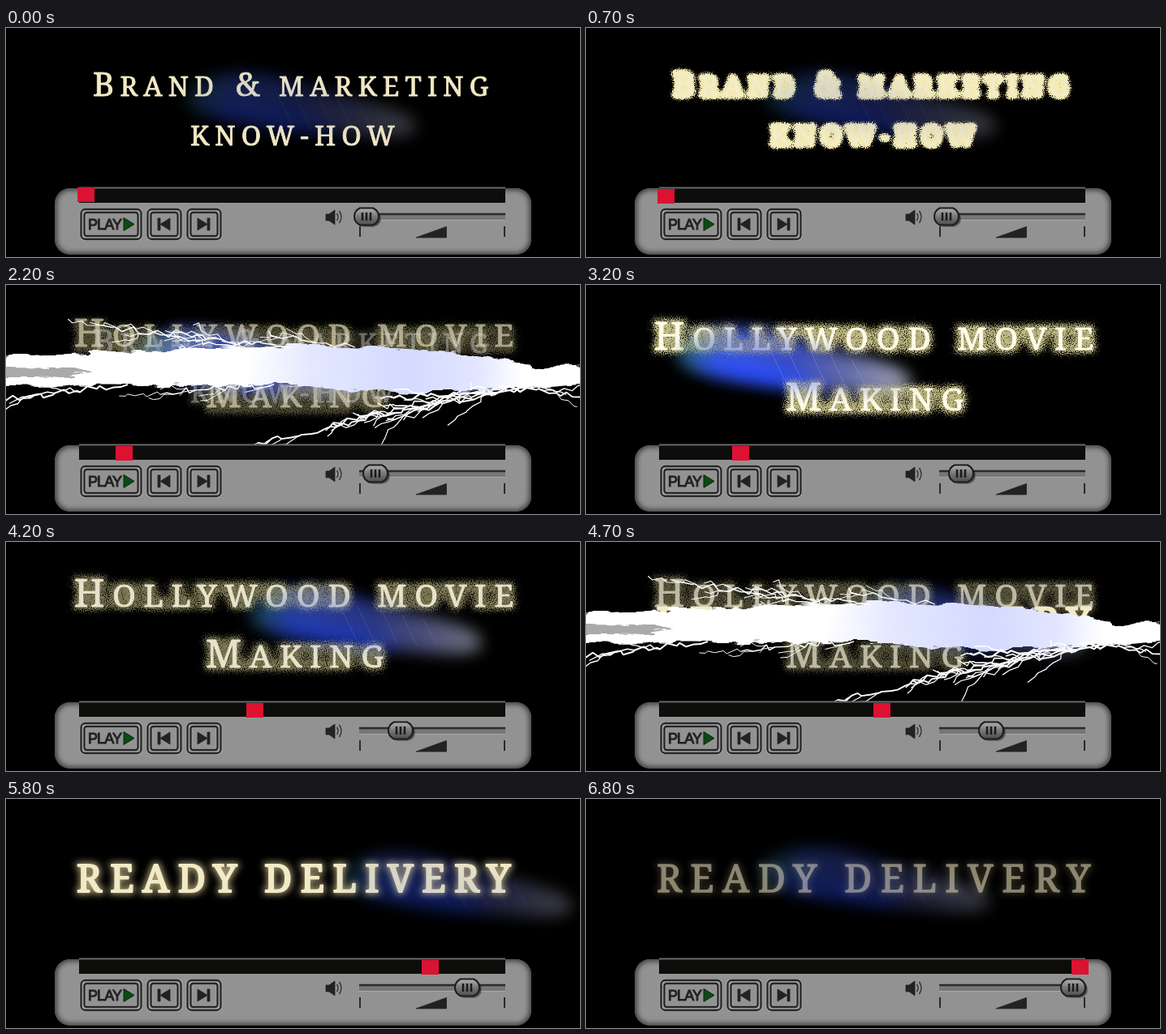
Animation of 707x283 px, one loop 7300 ms. Source, as an HTML page:

```html
<!DOCTYPE html>
<html lang="en">
<head>
<meta charset="utf-8">
<title>Title player</title>
<style>
html, body { margin: 0; width: 100%; height: 100%; overflow: hidden; background: #000; }
svg { display: block; width: 100%; height: 100%; }
.anim { animation: 7300ms step-end infinite; }
.face { font-family: "Noto Serif", "Liberation Serif", serif; fill: currentColor; stroke: currentColor; stroke-linejoin: round; }
.title { color: #f2e9c6; stroke-width: .9px; }
#t1 { font-size: 33px; letter-spacing: 7.2px; }
#t2 { font-size: 39px; letter-spacing: 9.7px; }
#t3 { font-size: 47px; letter-spacing: 10.5px; }
.first { animation-name: first; }
.second { animation-name: second; }
.third { animation-name: third; }
.fuzz1 { animation-name: fuzz1; filter: url(#fuzz); }
.halo1 { animation-name: halo1; filter: url(#halo); }
.halo2 { animation-name: halo2; filter: url(#halo); }
.soft3 { animation-name: soft3; filter: url(#soft); }
.streak { animation-name: streak; }
.bolt { animation-name: bolt; }
.head { animation-name: head; }
.knob { animation-name: knob; }

@keyframes first {
  0% { opacity: 1; color: #f2e9c6; }
  9.589% { opacity: 1; color: #f3ecc8; }
  16.438% { opacity: .95; color: #eeeada; }
  23.287% { opacity: .9; color: #dcdce4; }
  30.136% { opacity: .4; color: #dcdce4; }
  43.835%, 100% { opacity: 0; }
}
@keyframes fuzz1 {
  0% { opacity: 0; }
  2.739% { opacity: .4; }
  9.589% { opacity: 1; }
  16.438% { opacity: .5; }
  23.287%, 100% { opacity: 0; }
}
@keyframes halo1 {
  0% { opacity: 0; }
  16.438% { opacity: .8; }
  23.287% { opacity: .5; }
  30.136% { opacity: .2; }
  43.835%, 100% { opacity: 0; }
}
@keyframes second {
  0% { opacity: 0; transform: translateY(-8px); }
  23.287% { opacity: .22; transform: translateY(-8px); }
  30.136% { opacity: .6; transform: translateY(-4px); }
  43.835% { opacity: 1; transform: none; color: #fffbea; }
  57.534% { opacity: .9; transform: none; color: #f6f0da; }
  64.383% { opacity: .7; transform: none; color: #f0ead6; }
  65.753%, 100% { opacity: 0; transform: none; }
}
@keyframes halo2 {
  0% { opacity: 0; }
  30.136% { opacity: .4; }
  43.835% { opacity: 1; }
  50.684% { opacity: .85; }
  57.534% { opacity: .65; }
  64.383% { opacity: .45; }
  65.753%, 100% { opacity: 0; }
}
@keyframes third {
  0% { opacity: 0; }
  64.383% { opacity: 1; stroke-width: 3px; }
  72.602% { opacity: 1; stroke-width: 2.6px; }
  79.452% { opacity: 1; stroke-width: 2.2px; }
  86.301% { opacity: .75; stroke-width: 1.7px; }
  93.15%, 100% { opacity: .5; stroke-width: 1.3px; }
}
@keyframes soft3 {
  0% { opacity: 0; }
  64.383% { opacity: .4; }
  65.753% { opacity: 1; }
  72.602% { opacity: .9; }
  79.452% { opacity: .75; }
  86.301% { opacity: .45; }
  93.15%, 100% { opacity: .2; }
}
@keyframes streak {
  0% { opacity: .27; transform: translate(360px, 95px); }
  23.287% { opacity: .36; transform: translate(360px, 95px); }
  30.136% { opacity: .8; transform: translate(300px, 95px); }
  43.835% { opacity: 1; transform: translate(253px, 94px); }
  50.684% { opacity: .75; transform: translate(360px, 95px); }
  57.534% { opacity: .6; transform: translate(440px, 98px); }
  64.383% { opacity: .45; transform: translate(470px, 98px); }
  65.753% { opacity: .27; transform: translate(360px, 98px); }
  79.452% { opacity: .28; transform: translate(552px, 106px); }
  86.301%, 100% { opacity: .27; transform: translate(352px, 99px); }
}
@keyframes bolt {
  0% { opacity: 0; }
  30.136% { opacity: 1; }
  43.835% { opacity: 0; }
  64.383% { opacity: 1; }
  65.753%, 100% { opacity: 0; }
}
@keyframes head {
  0% { transform: translate(88px, 197px); }
  2.739% { transform: translate(88px, 199px); }
  23.287% { transform: translate(102px, 199px); }
  30.136% { transform: translate(135px, 199px); }
  43.835% { transform: translate(180px, 199px); }
  50.684% { transform: translate(238px, 199px); }
  57.534% { transform: translate(296px, 199px); }
  64.383% { transform: translate(354px, 199px); }
  65.753% { transform: translate(407px, 199px); }
  72.602% { transform: translate(460px, 199px); }
  79.452% { transform: translate(512px, 199px); }
  86.301% { transform: translate(555px, 199px); }
  93.15%, 100% { transform: translate(598px, 199px); }
}
@keyframes knob {
  0% { transform: translate(444px, 233px); }
  23.287% { transform: translate(449px, 233px); }
  30.136% { transform: translate(455px, 233px); }
  43.835% { transform: translate(462px, 233px); }
  50.684% { transform: translate(474px, 233px); }
  57.534% { transform: translate(486px, 233px); }
  64.383% { transform: translate(499px, 233px); }
  65.753% { transform: translate(522px, 233px); }
  72.602% { transform: translate(545px, 233px); }
  79.452% { transform: translate(568px, 233px); }
  86.301% { transform: translate(584px, 233px); }
  93.15%, 100% { transform: translate(600px, 233px); }
}
</style>
</head>
<body>
<svg viewBox="0 0 707 283" preserveAspectRatio="none">
  <defs>
    <filter id="fuzz" filterUnits="userSpaceOnUse" x="0" y="0" width="707" height="200" color-interpolation-filters="sRGB">
      <feMorphology in="SourceAlpha" operator="dilate" radius="1.5"/>
      <feGaussianBlur stdDeviation="3.6"/>
      <feComponentTransfer result="soft"><feFuncA type="linear" slope="1.6"/></feComponentTransfer>
      <feTurbulence type="fractalNoise" baseFrequency=".9" seed="4" result="grain"/>
      <feComposite in="soft" in2="grain" operator="arithmetic" k2="3" k3="5" k4="-3.4" result="mask"/>
      <feComponentTransfer in="soft" result="reach"><feFuncA type="linear" slope="2"/></feComponentTransfer>
      <feComposite in="mask" in2="reach" operator="in" result="cut"/>
      <feFlood flood-color="#f3eab4"/>
      <feComposite in2="cut" operator="in"/>
    </filter>
    <filter id="halo" filterUnits="userSpaceOnUse" x="0" y="0" width="707" height="200" color-interpolation-filters="sRGB">
      <feMorphology in="SourceAlpha" operator="dilate" radius="6"/>
      <feGaussianBlur stdDeviation="6" result="soft"/>
      <feTurbulence type="fractalNoise" baseFrequency=".9" seed="9" result="grain"/>
      <feComposite in="soft" in2="grain" operator="arithmetic" k2="1.9" k3="4" k4="-2.7" result="mask"/>
      <feComponentTransfer in="soft" result="reach"><feFuncA type="linear" slope="1.3"/></feComponentTransfer>
      <feComposite in="mask" in2="reach" operator="in" result="cut"/>
      <feFlood flood-color="#c2bc84"/>
      <feComposite in2="cut" operator="in"/>
    </filter>
    <filter id="soft" filterUnits="userSpaceOnUse" x="0" y="0" width="707" height="200" color-interpolation-filters="sRGB">
      <feMorphology in="SourceAlpha" operator="dilate" radius="2"/>
      <feGaussianBlur stdDeviation="4.5" result="blur"/>
      <feFlood flood-color="#e6d6a0"/>
      <feComposite in2="blur" operator="in"/>
    </filter>
    <filter id="blur" filterUnits="userSpaceOnUse" x="-220" y="-90" width="440" height="180"><feGaussianBlur stdDeviation="10"/></filter>
    <filter id="edge" filterUnits="userSpaceOnUse" x="40" y="180" width="627" height="103"><feGaussianBlur stdDeviation="3"/></filter>
    <filter id="ragged" filterUnits="userSpaceOnUse" x="-20" y="40" width="747" height="110">
      <feTurbulence type="fractalNoise" baseFrequency=".025 .09" numOctaves="3" seed="6"/>
      <feDisplacementMap in="SourceGraphic" scale="16" xChannelSelector="R" yChannelSelector="A"/>
    </filter>
    <linearGradient id="beam">
      <stop offset="0" stop-color="#2a7088" stop-opacity=".8"/>
      <stop offset=".2" stop-color="#3a58d0"/>
      <stop offset=".5" stop-color="#3c50c8" stop-opacity=".9"/>
      <stop offset=".72" stop-color="#6870b4" stop-opacity=".9"/>
      <stop offset="1" stop-color="#a4a8b4"/>
    </linearGradient>
    <linearGradient id="flare" gradientUnits="userSpaceOnUse" x1="0" y1="0" x2="707" y2="0">
      <stop offset=".42" stop-color="#fff"/>
      <stop offset=".53" stop-color="#e4e8ff"/>
      <stop offset=".7" stop-color="#d4daff"/>
      <stop offset=".82" stop-color="#e2e6ff"/>
      <stop offset=".9" stop-color="#fff"/>
    </linearGradient>
    <linearGradient id="metal" x2="0" y2="1">
      <stop offset="0" stop-color="#b0b0b0"/>
      <stop offset=".5" stop-color="#787878"/>
      <stop offset="1" stop-color="#4c4c4c"/>
    </linearGradient>
    <clipPath id="body"><rect x="60" y="198" width="587" height="82" rx="19"/></clipPath>

    <g id="t1" class="face">
      <text x="107" y="84"><tspan font-size="40">B</tspan>RAND</text>
      <text x="283" y="84" font-size="40">&amp;</text>
      <text x="336" y="84">MARKETING</text>
      <text x="227" y="145">KNOW-HOW</text>
    </g>
    <g id="t2" class="face">
      <text x="84" y="80"><tspan font-size="47">H</tspan>OLLYWOOD</text>
      <text x="457" y="80">MOVIE</text>
      <text x="246" y="155"><tspan font-size="47">M</tspan>AKING</text>
    </g>
    <g id="t3" class="face">
      <text x="87" y="115">READY</text>
      <text x="318" y="115">DELIVERY</text>
    </g>
    <g id="ray">
      <g filter="url(#blur)">
        <path d="M-138-10C-120-46-50-44 0-26S138 2 144 24S90 38 30 34S-150 16-138-10Z" fill="url(#beam)"/>
        <path d="M-118 2C-80-8-20 6 30 26S-90 26-118 2Z" fill="#2c50ff"/>
      </g>
      <path d="M-30-22l22 46M-8-20l24 50M22-16l20 44M48-8l18 38M74-2l16 30" stroke="#a8b8ff" stroke-opacity=".28" fill="none"/>
    </g>
    <g id="buttons" fill="none">
      <rect x="92.500" y="224" width="74" height="37" rx="5"/>
      <rect x="96.500" y="228" width="66" height="29" rx="3"/>
      <rect x="174.500" y="224" width="41" height="37" rx="5"/>
      <rect x="178.500" y="228" width="33" height="29" rx="3"/>
      <rect x="223.500" y="224" width="41" height="37" rx="5"/>
      <rect x="227.500" y="228" width="33" height="29" rx="3"/>
    </g>
  </defs>

  <rect width="707" height="283" fill="#000"/>
  <use href="#ray" class="anim streak"/>

  <use href="#t1" class="title anim halo1"/>
  <use href="#t1" class="title anim fuzz1"/>
  <use href="#t2" class="title anim halo2"/>
  <use href="#t3" class="title anim soft3"/>
  <use href="#t2" class="title anim second"/>
  <use href="#t1" class="title anim first"/>
  <use href="#t3" class="title anim third"/>
  <g opacity=".5"><use href="#ray" class="anim streak"/></g>

  <g class="anim bolt">
    <g filter="url(#ragged)">
      <path d="M-20 89C40 88 70 83 110 83S210 81 260 78S370 74 420 76S500 80 550 84S600 92 640 97S690 98 727 98V122C680 124 650 129 610 131S520 134 480 132S380 123 330 124S240 123 200 124S130 120 100 124S30 127-20 125Z" fill="url(#flare)"/>
      <path d="M-20 103C40 101 80 103 108 108C80 115 40 114-20 114Z" fill="#aaa"/>
    </g>
    <g id="arcs" fill="none" stroke="#fff" stroke-linejoin="bevel"></g>
  </g>

  <g>
    <rect x="60" y="198" width="587" height="82" rx="19" fill="#929292"/>
    <g clip-path="url(#body)">
      <rect x="59" y="197" width="589" height="84" rx="20" fill="none" stroke="#2c2c2c" stroke-width="6" filter="url(#edge)"/>
    </g>
    <rect x="90" y="198" width="525" height="18" fill="#0d0d0b"/>
    <path d="M90 197.500H615" stroke="#686868" stroke-width="2"/>

    <use href="#buttons" stroke="#a8a8a8" stroke-width="4"/>
    <use href="#buttons" stroke="#262626" stroke-width="2.300"/>
    <text x="101" y="249" font-family="Liberation Sans, Arial, sans-serif" font-size="18" letter-spacing="-.9" fill="#222" stroke="#222" stroke-width="1">PLAY</text>
    <path d="M145 234.500L158 242.500L145 250.500Z" fill="#0b4a14" stroke="#10240f"/>
    <g fill="#222" stroke="#222" stroke-width=".8">
      <path d="M187 235h3v15h-3zM202 235v15l-12-7.500z"/>
      <path d="M236 235v15l12-7.500zM248 235h3v15h-3z"/>
      <path d="M394 230h4l7-5v18l-7-5h-4z"/>
      <path d="M505 259L542.500 245.500V259Z"/>
    </g>
    <path d="M407.500 229q3 4.500 0 9M410.500 226q5 7.500 0 15" fill="none" stroke="#333" stroke-width="1.500"/>
    <rect x="435" y="229" width="180" height="8" fill="#777"/>
    <path d="M435 230H615" stroke="#2a2a2a" stroke-width="2.500"/>
    <path d="M435 237.500H615" stroke="#a8a8a8"/>
    <path d="M436 245V258M614 245V258" stroke="#2a2a2a" stroke-width="2"/>

    <rect class="anim head" width="21" height="18" fill="#dc1232"/>
    <g class="anim knob">
      <rect x="-13" y="-8" width="31" height="21" rx="10" fill="#222" opacity=".4"/>
      <rect x="-13" y="-9" width="30" height="20.500" rx="9" fill="#222" opacity=".5"/>
      <path d="M-8-10.500H8Q15-7 15 0T8 10.500H-8Q-15 7-15 0T-8-10.500Z" fill="url(#metal)" stroke="#1c1c1c" stroke-width="2"/>
      <path d="M-5-5V5M0-5V5M5-5V5" stroke="#1a1a1a" stroke-width="2.500"/>
    </g>
  </g>
</svg>
<script>
let seed = 17;
const rand = () => (seed = (seed * 16807) % 2147483647) / 2147483647;
const arcs = document.getElementById("arcs");

// Jagged spark between two points, with smaller offshoots.
function spark(x0, y0, x1, y1, width, forks) {
  const dx = x1 - x0, dy = y1 - y0, len = Math.hypot(dx, dy);
  const n = Math.max(3, Math.round(len / 8));
  let d = `M${x0} ${y0}`;
  for (let i = 1; i <= n; i++) {
    const k = i / n;
    const x = x0 + dx * k + (rand() - .5) * 8;
    const y = y0 + dy * k + (rand() - .5) * 8;
    d += `L${x.toFixed(1)} ${y.toFixed(1)}`;
    if (forks && rand() < .35) {
      const reach = 15 + rand() * 40;
      const turn = Math.atan2(dy, dx) + (rand() - .5) * .9;
      spark(x, y, x + Math.cos(turn) * reach, y + Math.sin(turn) * reach, width * .7, forks - 1);
    }
  }
  const path = document.createElementNS("http://www.w3.org/2000/svg", "path");
  path.setAttribute("d", d);
  path.setAttribute("stroke-width", width);
  arcs.append(path);
}

[
  [300, 79, 122, 50, 1.5, 1],
  [350, 77, 178, 58, 1.5, 1],
  [430, 77, 320, 60, 1.3, 1],
  [150, 123, 0, 141, 2, 1],
  [330, 123, 190, 133, 1.4, 1],
  [590, 130, 312, 195, 1.8, 1],
  [640, 127, 400, 172, 2, 1],
  [560, 131, 470, 168, 1.7, 1],
  [650, 127, 470, 140, 2.2, 1],
  [600, 129, 545, 172, 1.3, 0],
  [610, 127, 707, 136, 1.8, 1],
  [660, 124, 707, 154, 1, 0]
].forEach(a => spark(...a));
</script>
</body>
</html>
```
